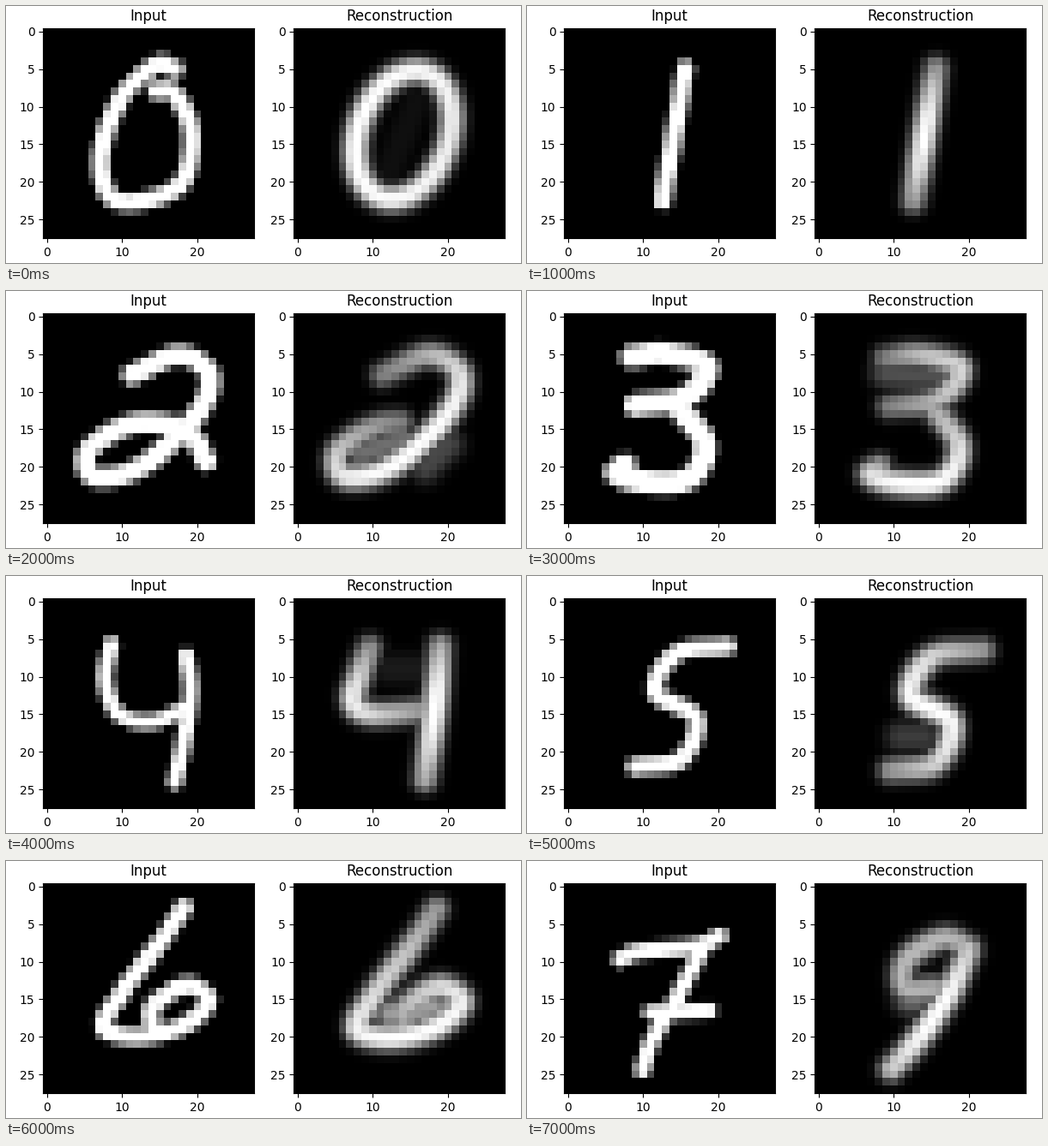
A matplotlib script for the animation above (8 s loop, 600 by 300 pixels).

```python
import numpy as np
import matplotlib.pyplot as plt
from matplotlib.animation import FuncAnimation

W, H, DPI = 600, 300, 100
CELLS = 28
BOX = 245.4        # panel side in pixels
TOP = 25.6
ROWS, COLS = np.mgrid[0:CELLS, 0:CELLS]


def spline(points, steps=24):
    """Catmull-Rom curve through the key points."""
    p = np.array(points, float)
    p = np.vstack([2 * p[0] - p[1], p, 2 * p[-1] - p[-2]])
    u = np.linspace(0, 1, steps)[:, None]
    spans = []
    for a, b, c, d in zip(p, p[1:], p[2:], p[3:]):
        spans.append(b + 0.5 * u * (c - a + u * (2 * a - 5 * b + 4 * c - d
                                                 + u * (3 * (b - c) + d - a))))
    return np.vstack(spans)


def oval(cx, cy, rx, ry, lean):
    t = np.linspace(0, 2 * np.pi, 200)
    return np.column_stack([cx + rx * np.cos(t) - lean * np.sin(t),
                            cy + ry * np.sin(t)])


def distance(path):
    return np.hypot(COLS[..., None] - path[:, 0], ROWS[..., None] - path[:, 1])


def pen(*paths, r=1.15):
    """Crisp ink with a one-cell soft edge."""
    return np.clip(r + 0.5 - distance(np.vstack(paths)).min(axis=-1), 0, 1)


def glow(*paths, peak=0.97, ends=0.6, width=1.75):
    """Blurred ink, brightest halfway along each path."""
    img = np.zeros((CELLS, CELLS))
    for path in paths:
        swell = np.sin(np.linspace(0, np.pi, len(path)))
        level = peak * (ends + (1 - ends) * swell)
        blur = np.exp(-(distance(path) / width) ** 2.5)
        img = np.maximum(img, (level * blur).max(axis=-1))
    return img


def fill(a, b, level):
    """Faint haze between two points."""
    return glow(spline([a, b]), peak=level, ends=1, width=2.2)


def layer(*images):
    return np.maximum.reduce(images)


def zero():
    ink = spline([(17, 5), (14.5, 4.5), (9.8, 9), (7.2, 16.5), (8.5, 22),
                  (13, 22.5), (18, 20), (19.2, 13.5), (17, 8.4), (14.5, 7.9)])
    ring = oval(14.1, 13.8, 6.2, 8.5, 1.6)
    return pen(ink), layer(glow(ring, ends=0.93), fill((16, 9), (12, 19), 0.06))


def one():
    stem = spline([(15.6, 5), (12.6, 22.5)])
    return pen(stem), glow(stem)


def two():
    path = spline([(11.3, 7.8), (17.5, 5.2), (21.6, 7.8), (19.8, 13.2),
                   (12.5, 20), (6.3, 21.3), (5.6, 17.8), (11.5, 14.3),
                   (18.5, 15.2), (21.2, 19.3)])
    body = glow(path[:-40], ends=0.5)
    return pen(path, r=1.35), layer(body, fill((8.5, 18.2), (14, 16.5), 0.42),
                                    fill((17, 20), (20, 17), 0.27))


def three():
    upper = spline([(8.5, 5.4), (13, 5), (18.5, 6.7), (15.5, 10.8), (9, 11.8)])
    lower = spline([(14.5, 11.8), (18.2, 17), (16, 21.6), (10, 22),
                    (6.4, 20.9), (7.6, 19.8)])
    soft = layer(glow(upper + (0.4, 0.2), peak=0.8, ends=0.6),
                 glow(lower + (0.5, 0.2), ends=0.65),
                 fill((9, 7.5), (16, 8), 0.3))
    return pen(upper, lower, r=1.5), soft


def four():
    hook = spline([(8.6, 5.7), (7.8, 10.5), (9.6, 15), (14, 16), (18.5, 14.2)])
    stem = spline([(18.5, 7.3), (19.1, 12), (18.2, 18.5), (17, 24)])
    wide = spline([(9.6, 6.2), (8.2, 10), (7.4, 13.3), (10, 15), (17.5, 14.4)])
    tall = spline([(19, 6), (18.3, 14), (16.9, 23.7)])
    return pen(hook, stem, r=1), layer(glow(wide, peak=0.9), glow(tall, ends=0.65),
                                       fill((12, 9), (16, 9), 0.1))


def five():
    path = spline([(21.2, 6), (14.5, 6.9), (11.6, 12), (17, 15.5),
                   (15, 21), (9, 22)])
    return pen(path), layer(glow(path + (0.6, 0.5), peak=0.92),
                            fill((11, 18), (14, 18), 0.22))


def six():
    path = spline([(18.2, 2.8), (15, 7.5), (10.2, 13.8), (7.6, 18.7),
                   (12, 20), (18, 18.6), (21.5, 15.2), (18.5, 13.2),
                   (14.2, 15.8), (14, 18.8)])
    soft = glow(path + (0.3, 0.2), ends=0.6)
    return pen(path), layer(soft, fill((12.5, 17), (18, 16), 0.6))


def seven():
    bar = spline([(7, 9.7), (9.5, 8.7), (17, 8), (20.2, 6.6)])
    stem = spline([(18, 8), (14.2, 15.3), (11.2, 20.5), (9.9, 24.4)])
    cross = spline([(11, 16.8), (18.7, 16.5)])
    tail = spline([(20, 8.5), (17.5, 14), (13.5, 20), (9.7, 24.3)])
    loop = spline([(15.5, 13.6), (11.5, 13.5), (11.7, 9.8), (16.5, 6.9), (20, 8.2)])
    soft = layer(glow(tail, ends=0.78), glow(loop, peak=0.7, ends=0.95),
                 fill((12, 15), (13, 15), 0.4))
    return pen(bar, stem, cross, r=1.05), soft


DIGITS = [draw() for draw in (zero, one, two, three, four, five, six, seven)]

fig = plt.figure(figsize=(W / DPI, H / DPI), dpi=DPI, facecolor="white")


def panel(left, title):
    ax = fig.add_axes([left / W, 1 - (TOP + BOX) / H, BOX / W, BOX / H])
    view = ax.imshow(np.zeros((CELLS, CELLS)), cmap="gray", vmin=0, vmax=1,
                     interpolation="nearest")
    ax.set_title(title)
    ax.set_xticks(range(0, CELLS, 10))
    ax.set_yticks(range(0, CELLS, 5))
    return view


views = [panel(43.2, "Input"), panel(335.4, "Reconstruction")]


def update(i):
    ink, soft = DIGITS[i]
    views[0].set_data(ink)
    views[1].set_data(soft / soft.max())
    return views


anim = FuncAnimation(fig, update, frames=len(DIGITS), interval=1000,
                     init_func=lambda: update(0), repeat=True, repeat_delay=0)
plt.show()
```
